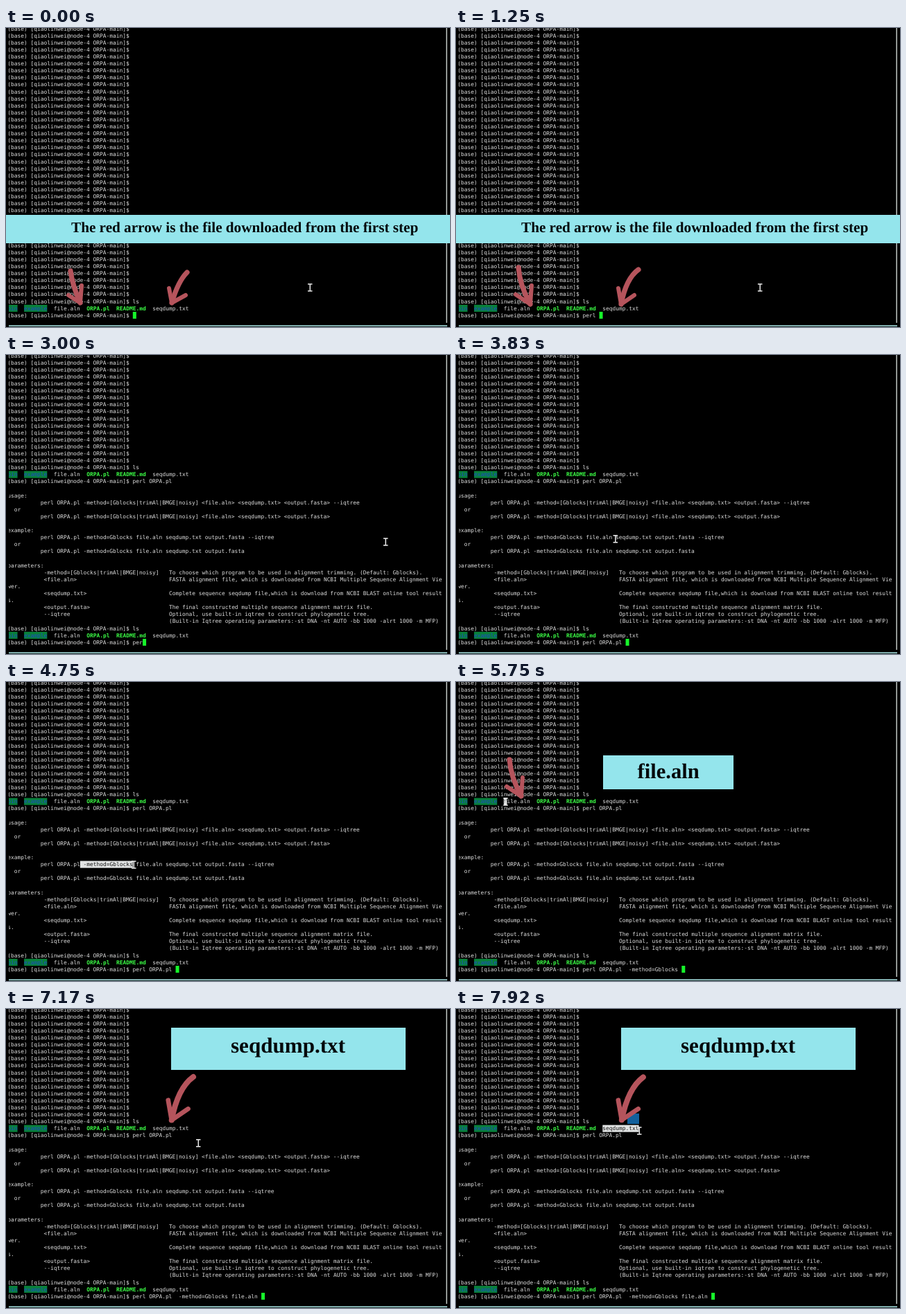
Animation, 640 px wide and 432 px high, one loop 8000 ms. Source, as an HTML page with a canvas:

```html
<!DOCTYPE html>
<html lang="en">
<head>
<meta charset="utf-8">
<title>Terminal walkthrough</title>
<style>
html, body { margin: 0; width: 100%; height: 100%; overflow: hidden; background: #000; }
canvas { display: block; width: 640px; height: 432px; }
</style>
</head>
<body>
<canvas id="stage" width="640" height="432"></canvas>
<script>
const ctx = document.getElementById('stage').getContext('2d');
const LOOP = 8000;
const LEFT = 2.3, CELL = 4.75, LINE = 10.1, LAST_Y = 415;
const MONO = '7.89px "DejaVu Sans Mono", monospace';
const SERIF = '"Liberation Serif", "Times New Roman", serif';
const TEXT = '#dedede', GREEN = '#3cff46', MARK = '#e2e4e4', ARROW = '#b5545c';
const PROMPT = '(base) [qiaolinwei@node-4 ORPA-main]$ ';

// A row is a list of runs: [column, text, colour, bold, background]
const row = (...parts) => {
  const runs = [];
  for (let i = 0; i < parts.length; i += 2) runs.push([parts[i], parts[i + 1], TEXT]);
  return runs;
};
const prompt = (input = '') => row(0, PROMPT + input);
const listing = [
  [0, 'bin', '#1f48c8', false, '#08803a'],
  [5, 'example', '#1f48c8', false, '#08803a'],
  [14, 'file.aln', TEXT],
  [24, 'ORPA.pl', GREEN, true],
  [33, 'README.md', GREEN, true],
  [44, 'seqdump.txt', TEXT]
];

const usage = 'perl ORPA.pl -method=[Gblocks|trimAl|BMGE|noisy] <file.aln> <seqdump.txt> <output.fasta>';
const sample = 'perl ORPA.pl -method=Gblocks file.aln seqdump.txt output.fasta';
const help = [
  row(),
  row(0, 'usage:'),
  row(10, usage + ' --iqtree'),
  row(2, 'or'),
  row(10, usage),
  row(),
  row(0, 'example:'),
  row(10, sample + ' --iqtree'),
  row(2, 'or'),
  row(10, sample),
  row(),
  row(0, 'parameters:'),
  row(11, '-method=[Gblocks|trimAl|BMGE|noisy]', 49, 'To choose which program to be used in alignment trimming. (Default: Gblocks).'),
  row(11, '<file.aln>', 49, 'FASTA alignment file, which is downloaded from NCBI Multiple Sequence Alignment Vie'),
  row(0, 'wer.'),
  row(11, '<seqdump.txt>', 49, 'Complete sequence seqdump file,which is download from NCBI BLAST online tool result'),
  row(0, 's.'),
  row(11, '<output.fasta>', 49, 'The final constructed multiple sequence alignment matrix file.'),
  row(11, '--iqtree', 49, 'Optional, use built-in iqtree to construct phylogenetic tree.'),
  row(49, '(Built-in Iqtree operating parameters:-st DNA -nt AUTO -bb 1000 -alrt 1000 -m MFP)')
];

const blanks = Array.from({ length: 42 }, () => prompt());
const start = [...blanks, prompt('ls'), listing];
const afterRun = [...start, prompt('perl ORPA.pl'), ...help];
const afterList = [...afterRun, prompt('ls'), listing];
const screens = [[0, start], [1670, afterRun], [2640, afterList]];

// What stands on the input line from each time on
const inputs = [
  [0, ''], [850, 'p'], [940, 'pe'], [1030, 'per'], [1120, 'perl'], [1210, 'perl '],
  [1330, 'perl O'], [1420, 'perl OR'], [1510, 'perl ORPA.pl'], [1670, ''],
  [2450, 'l'], [2540, 'ls'], [2640, ''],
  [2790, 'p'], [2870, 'pe'], [2960, 'per'], [3050, 'perl'], [3140, 'perl '],
  [3250, 'perl O'], [3340, 'perl OR'], [3450, 'perl ORPA.pl '],
  [5000, 'perl ORPA.pl  -method=Gblocks'], [5200, 'perl ORPA.pl  -method=Gblocks '],
  [6300, 'perl ORPA.pl  -method=Gblocks file.aln'],
  [6750, 'perl ORPA.pl  -method=Gblocks file.aln ']
];

// Pointer path: time, x, y
const path = [
  [0, 438, 375], [2500, 438, 375], [2950, 547, 270], [3420, 547, 270],
  [4050, 107, 264], [4150, 107, 264], [4650, 184, 264], [5050, 184, 264],
  [5600, 69, 173], [5700, 69, 173], [6050, 108, 173], [6200, 108, 173],
  [6500, 434, 237], [6850, 434, 237], [7350, 212, 176], [7450, 212, 176],
  [7850, 264, 176], [8000, 264, 176]
];

// Text marked by dragging; "up" counts rows from the input line
const marks = [
  { from: 4150, to: 5700, up: 15, col: 22, text: ' -method=Gblocks' },
  { from: 5700, to: 6750, up: 24, col: 14, text: 'file.aln' },
  { from: 7450, to: 8000, up: 24, col: 44, text: 'seqdump.txt' }
];

const banners = [
  { from: 0, to: 1750, box: [0, 270, 640, 41], text: 'The red arrow is the file downloaded from the first step', x: 94, y: 295, size: 21.2 },
  { from: 5300, to: 6750, box: [212, 106, 188, 49], text: 'file.aln', x: 261.5, y: 139, size: 30.6 },
  { from: 6750, to: 8000, box: [238, 27, 338, 61], text: 'seqdump.txt', x: 324, y: 62.6, size: 31.1 }
];

// Arrow poses relative to the tip: tail, bend, tip, two barbs
const leanRight = [
  [[-14, -46], [-11, -24], [0, 0], [-17, -11], [2, -25]],
  [[-17, -51], [-15, -25], [0, 2], [-21, -12], [2, -25]]
];
const leanLeft = [
  [[22, -44], [9, -31], [0, 0], [-4, -21], [20, -11]],
  [[24, -48], [6, -35], [-1, 2], [-5, -21], [18, -11]]
];
const arrows = [
  { from: 0, to: 1750, pose: leanRight, x: 107, y: 397, scale: 1 },
  { from: 0, to: 1750, pose: leanLeft, x: 239, y: 397, scale: 1 },
  { from: 5300, to: 6750, pose: leanRight, x: 94, y: 163, scale: 1 },
  { from: 6750, to: 8000, pose: leanLeft, x: 240, y: 158, scale: 1.25 }
];

const mix = (a, b, k) => a + (b - a) * k;
const during = (t, item) => t >= item.from && t < item.to;
const latest = (list, t) => list.filter(item => item[0] <= t).pop()[1];
const colX = col => LEFT + col * CELL;
const rowY = up => LAST_Y - up * LINE;

function fill(color, x, y, w, h) {
  ctx.fillStyle = color;
  ctx.fillRect(x, y, w, h);
}

function cells(col, up, text, color, bold, back) {
  const x = colX(col), y = rowY(up);
  if (back) fill(back, x, y - 5, text.length * CELL, LINE);
  ctx.font = (bold ? 'bold ' : '') + MONO;
  ctx.fillStyle = color;
  ctx.fillText(text, x, y + 2.7);
}

function drawTerminal(t, mouseX) {
  const input = latest(inputs, t);
  const rows = latest(screens, t);
  ctx.save();
  ctx.beginPath();
  ctx.rect(4, 0, 631, 428);
  ctx.clip();
  for (let up = 1; up <= 41; up++) {
    for (const [col, ...run] of rows[rows.length - up]) cells(col, up, ...run);
  }
  cells(0, 0, PROMPT + input, TEXT);
  fill('#16f52a', colX(PROMPT.length + input.length), 410, 5, 10);
  for (const m of marks.filter(m => during(t, m))) {
    const dragging = t < m.from + 500;
    const n = dragging ? Math.round((mouseX - colX(m.col)) / CELL) : m.text.length;
    const part = m.text.slice(0, Math.max(0, n));
    if (part) cells(m.col, m.up, part, '#141414', false, MARK);
  }
  ctx.restore();
  fill('#dfe6e2', 634.5, 0, 1.3, 426);
  fill('#a9e6e6', 4, 429.5, 632, 1.6);
}

function pointer(t) {
  const i = Math.max(1, path.findIndex(p => p[0] > t));
  const [t0, x0, y0] = path[i - 1], [t1, x1, y1] = path[i];
  const k = (t - t0) / (t1 - t0), s = k * k * (3 - 2 * k);
  return [mix(x0, x1, s), mix(y0, y1, s)];
}

function drawBanner({ box, text, x, y, size }) {
  fill('#94e5ec', ...box);
  ctx.font = `bold ${size}px ${SERIF}`;
  ctx.fillStyle = '#040a0c';
  ctx.fillText(text, x, y);
}

function drawArrow({ from, pose, x, y, scale }, t) {
  const k = (1 - Math.cos((t - from) / 1250 * 3 * Math.PI)) / 2;
  const [tail, bend, tip, b1, b2] = pose[0].map((p, i) =>
    p.map((v, axis) => (axis ? y : x) + scale * mix(v, pose[1][i][axis], k)));
  ctx.strokeStyle = ARROW;
  ctx.lineCap = ctx.lineJoin = 'round';
  ctx.lineWidth = 7.2 * Math.sqrt(scale);
  ctx.beginPath();
  ctx.moveTo(...tail);
  ctx.quadraticCurveTo(...bend, ...tip);
  ctx.stroke();
  ctx.lineWidth = 6 * Math.sqrt(scale);
  ctx.beginPath();
  ctx.moveTo(...b1);
  ctx.lineTo(...tip);
  ctx.lineTo(...b2);
  ctx.stroke();
}

function drawKey() {
  ctx.beginPath();
  ctx.roundRect(598, 254, 60, 104, 5);
  ctx.fillStyle = '#000';
  ctx.fill();
  ctx.strokeStyle = '#2a2a2a';
  ctx.lineWidth = 1;
  ctx.stroke();
  ctx.strokeStyle = '#f6f6f6';
  ctx.lineWidth = 5;
  ctx.beginPath();
  ctx.roundRect(621, 277, 56, 55, 13);
  ctx.stroke();
  ctx.lineWidth = 2;
  ctx.beginPath();
  ctx.moveTo(629, 290);
  ctx.lineTo(633, 286);
  ctx.lineTo(637, 290);
  ctx.stroke();
}

function drawPointer(x, y) {
  ctx.strokeStyle = '#ececec';
  ctx.lineCap = 'butt';
  ctx.lineWidth = 1.5;
  ctx.beginPath();
  for (const end of [-5, 5]) {
    ctx.moveTo(x - 3, y + end);
    ctx.lineTo(x + 3.5, y + end);
  }
  ctx.moveTo(x + 0.3, y - 5);
  ctx.lineTo(x + 0.3, y + 5);
  ctx.stroke();
}

function draw(t) {
  const [mx, my] = pointer(t);
  ctx.textRendering = 'geometricPrecision';
  fill('#000', 0, 0, 640, 432);
  drawTerminal(t, mx);
  if (t >= 1920 && t < 2420) drawKey();
  if (t >= 7850) fill('#12609c', 247, 151, 17, 15);
  drawPointer(mx, my);
  banners.filter(b => during(t, b)).forEach(drawBanner);
  arrows.filter(a => during(t, a)).forEach(a => drawArrow(a, t));
}

const origin = performance.now();
function tick() {
  draw((performance.now() - origin) % LOOP);
  requestAnimationFrame(tick);
}
tick();
</script>
</body>
</html>
```
